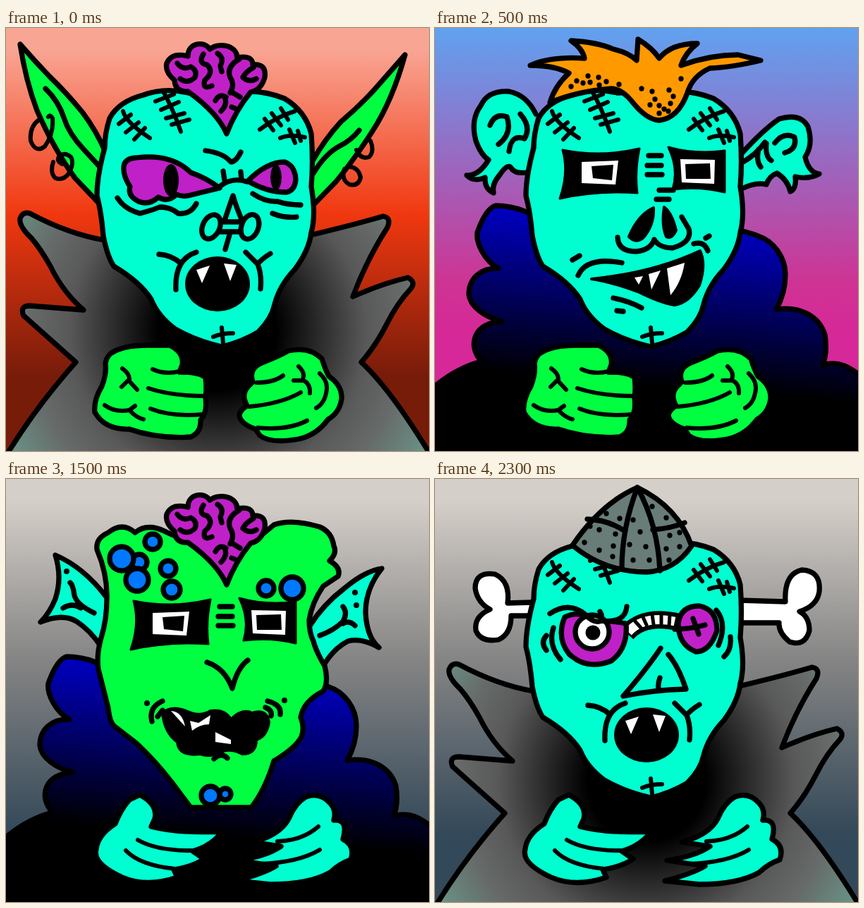
Animation of 600 by 600 pixels, one loop 2.5 s. Source, as an HTML page:

```html
<!DOCTYPE html>
<html lang="en">
<head>
<meta charset="utf-8">
<title>Monster mix</title>
<style>
  html, body { margin: 0; width: 100%; height: 100%; overflow: hidden; }
  svg { display: block; width: 100vw; height: 100vh; }
  g { fill: none; stroke: #000; stroke-width: 7.3; stroke-linecap: round; stroke-linejoin: round; }
  .thin { stroke-width: 6; }
  .cyan { fill: #00ffd0; }
  .green { fill: #00ff40; }
  .purple { fill: #c020c8; }
  .blue { fill: #0078ff; }
  .orange { fill: #ff9900; }
  .yellow { fill: #fff000; }
  .steel { fill: #687c78; }
  .white { fill: #fff; }
  .black { fill: #000; }
  .open { fill: none; }
  .flat { stroke: none; }
</style>
</head>
<body>
<svg viewBox="0 0 600 600">
  <defs>
    <linearGradient id="sunset" x2="0" y2="1">
      <stop offset=".05" stop-color="#f9a594"/><stop offset=".44" stop-color="#f03810"/><stop offset=".82" stop-color="#781c0a"/>
    </linearGradient>
    <linearGradient id="candy" x2="0" y2="1">
      <stop stop-color="#60a2f0"/><stop offset=".6" stop-color="#ce3494"/><stop offset=".72" stop-color="#d62898"/>
    </linearGradient>
    <linearGradient id="fog" x2="0" y2="1">
      <stop offset=".05" stop-color="#d5cfc9"/><stop offset=".43" stop-color="#848484"/><stop offset=".84" stop-color="#334858"/>
    </linearGradient>
    <linearGradient id="fur" gradientUnits="userSpaceOnUse" x1="90" x2="70" y1="255" y2="488">
      <stop stop-color="#0000c0"/><stop offset="1" stop-color="#000"/>
    </linearGradient>
    <radialGradient id="cloak" gradientUnits="userSpaceOnUse" cx="300" cy="430" r="350">
      <stop offset=".24" stop-color="#000"/><stop offset=".6" stop-color="#585858"/>
      <stop offset=".76" stop-color="#666a69"/><stop offset="1" stop-color="#6a988a"/>
    </radialGradient>
  </defs>

  <!-- backdrops -->
  <g class="flat" data-in="02"><rect width="600" height="600" fill="url(#sunset)"/></g>
  <g class="flat" data-in="1"><rect width="600" height="600" fill="url(#candy)"/></g>
  <g class="flat" data-in="34"><rect width="600" height="600" fill="url(#fog)"/></g>

  <!-- ears -->
  <g data-in="02">
    <path class="green" d="M142 178Q128 145 108 119Q85 91 62 69Q40 46 20 23Q28 75 44 117Q68 172 98 213L135 252"/>
    <path class="green" d="M434 190Q452 158 475 133Q500 112 522 88L566 38Q548 103 520 146Q495 185 468 218L434 253"/>
    <path d="M56 86Q74 103 82 127Q89 150 111 173L134 198M501 145Q490 159 474 167Q453 178 436 206"/>
    <path class="thin" d="M47 130Q33 140 35 160Q42 178 55 168Q68 150 66 128Q63 122 60 126M67 190Q62 205 70 213Q82 217 90 205Q97 190 92 183Q84 176 76 181Q70 188 80 193M517 160Q523 175 515 183Q503 187 497 173M480 200Q475 215 487 222Q500 225 503 212Q500 198 488 197"/>
  </g>
  <g data-in="1" class="cyan">
    <path d="M143 122Q130 95 105 90Q75 88 65 110Q50 130 58 160Q65 180 76 187Q62 210 45 209Q55 219 71 212Q70 228 83 234Q80 222 92 208Q104 190 109 200Q115 207 130 205"/>
    <path d="M435 178Q465 145 488 129Q518 120 529 140Q537 165 525 183Q530 205 545 207Q530 215 511 211Q513 228 504 232Q500 215 485 206Q474 210 470 222Q455 218 435 228"/>
    <path class="open" d="M78 138Q85 120 102 126Q110 150 90 165M121 122Q137 140 127 157Q108 150 105 175M437 190Q455 180 468 162M459 172Q455 188 462 197M470 164Q468 182 477 188M482 163Q495 147 510 155Q514 172 496 177"/>
  </g>
  <g data-in="3" class="cyan">
    <path d="M142 167Q110 125 70 108Q80 140 70 170Q62 190 49 203Q80 190 100 202Q120 215 135 238"/>
    <path d="M431 208Q450 178 480 155Q510 130 533 127Q510 155 510 190Q512 225 529 239Q505 225 485 230Q465 240 450 265"/>
    <path class="open" d="M91 147Q95 150 97 165Q100 178 125 190M81 183Q94 175 106 183M478 181Q485 190 478 202Q465 215 445 222M478 205Q487 200 495 208"/>
    <path stroke-width="8" d="M86 131h0M495 161h0M497 179h0"/>
  </g>
  <g data-in="4" class="white">
    <path d="M137 175L103 176Q107 145 85 135Q57 131 57 155Q60 175 78 185Q55 195 58 215Q65 232 90 228Q108 220 108 194H137"/>
    <path d="M431 172L497 174Q495 135 520 129Q548 130 545 160Q542 180 517 188Q531 195 531 215Q525 238 503 231Q487 218 488 204H431"/>
  </g>

  <!-- bodies -->
  <g data-in="04">
    <path fill="url(#cloak)" d="M3 602Q46 533 99 474L25 408Q19 394 34 394L110 400Q81 375 63 338Q49 313 36 298Q18 281 20 270Q24 260 34 263Q88 292 140 301L300 330L435 293Q490 280 535 267Q547 269 541 283Q512 328 492 381Q535 362 570 354Q582 360 574 370Q555 390 540 420Q525 450 504 474Q545 512 600 602"/>
  </g>
  <g data-in="123">
    <path fill="url(#fur)" d="M-5 512Q30 482 66 473C45 450 55 418 95 416C70 410 50 395 48 378C48 355 65 340 90 341C70 330 58 305 60 290Q72 256 86 252Q110 252 132 262L300 300L436 288Q455 293 458 295C480 302 497 325 497 350C497 370 492 385 484 399C520 394 545 410 553 435Q557 460 550 478C575 471 590 483 605 494V610H-5Z"/>
  </g>

  <!-- heads -->
  <g data-in="014">
    <path class="cyan" d="M258 92Q225 84 195 95Q160 104 147 128Q140 150 140 170Q129 210 129 238Q135 260 138 295Q144 325 153 338Q190 360 206 385Q215 408 240 427Q270 444 306 452Q335 445 358 431Q377 412 381 392Q388 365 410 342Q430 315 433 290Q440 265 433 225Q436 190 433 150Q425 118 395 100Q370 90 345 90Z"/>
    <path class="thin" d="M166 118Q170 134 204 156M160 136L177 123M170 148L188 134M182 158L197 142M223 90Q237 115 248 147M212 104L238 94M220 116L245 105M227 128L253 121M235 137L260 130M360 144Q385 125 410 118M367 129L379 145M377 121L390 138M390 114L400 130M389 156Q403 150 424 155M402 144L410 163M414 146L418 160M306 425L308 447M294 438Q305 433 322 433"/>
  </g>
  <g data-in="23">
    <path class="green" d="M258 86Q240 82 225 74Q200 62 183 76Q165 60 145 76Q127 84 129 100Q144 135 143 170Q143 200 135 225Q128 250 131 270L145 325Q147 345 154 351L185 375Q210 398 235 430L262 466H348Q368 440 380 400Q410 382 419 366Q424 352 418 338Q422 315 450 301Q458 288 452 265Q440 245 436 230Q430 218 430 200Q434 175 450 152L471 138Q476 126 459 116Q470 105 465 95Q462 75 445 68Q405 56 380 65L350 90L315 92Z"/>
    <g class="blue">
      <circle cx="189" cy="118" r="11"/><circle cx="164" cy="113" r="17"/><circle cx="186" cy="143" r="16"/>
      <circle cx="208" cy="89" r="11"/><circle cx="230" cy="127" r="11"/><circle cx="235" cy="157" r="12"/>
      <circle cx="369" cy="155" r="11"/><circle cx="406" cy="155" r="16"/>
      <circle cx="311" cy="447" r="8"/><circle cx="290" cy="449" r="13"/>
    </g>
  </g>

  <!-- hair and hats -->
  <g data-in="03">
    <path class="purple" d="M258 90Q240 91 239 74Q225 62 228 50Q235 34 258 40C258 20 282 18 289 30C302 20 327 24 328 42Q350 38 350 52Q370 50 367 70Q362 88 347 91Q325 118 313 150Q300 120 258 90Z"/>
    <path d="M243 50Q250 60 262 55Q272 60 268 70Q258 80 247 72M280 37Q272 50 285 52Q296 62 282 74Q278 88 292 82M300 36Q310 42 304 54L306 62M331 44Q312 55 318 70Q325 80 318 92M351 56Q340 62 336 70Q345 78 355 72M297 103Q303 92 312 98M305 118Q315 108 310 98M322 92L332 98M320 112L327 115"/>
  </g>
  <g data-in="1">
    <path class="orange" d="M163 106Q170 82 190 64Q170 53 135 53Q165 40 212 43Q210 30 193 18Q230 20 253 30Q275 35 286 46L288 16Q308 28 318 43Q335 22 372 22Q355 35 349 53Q390 38 430 38L462 46Q420 56 390 57Q365 68 358 92Q345 128 318 131Q300 130 280 105Q265 86 250 86Q200 90 163 106Z"/>
    <path d="M193 83h0M201 75h0M210 78h0M217 68h0M220 77h0M232 70h0M233 81h0M243 76h0M261 80h0M349 72h0M293 86h0M308 90h0M312 101h0M305 109h0M318 110h0M332 88h0M338 97h0M334 107h0M325 115h0M318 121h0M331 118h0"/>
  </g>
  <g data-in="2">
    <path class="yellow" d="M263 86Q252 55 270 40Q300 30 327 43Q345 21 372 28Q402 40 404 70Q405 112 370 119Q340 119 322 98L312 90Z"/>
    <path d="M290 83Q290 67 305 69Q314 76 322 97M328 42Q325 62 337 80Q348 100 366 93Q372 72 354 69"/>
  </g>
  <g data-in="4">
    <path class="steel" d="M195 94Q235 35 287 12Q345 40 364 95Q340 130 300 132Q240 132 195 94Z"/>
    <path d="M287 12Q265 70 265 127M287 12Q316 65 319 130M216 57Q245 58 268 73M309 72Q335 70 354 62"/>
    <path d="M243 49h0M262 56h0M220 67h0M233 72h0M256 78h0M212 90h0M233 101h0M253 95h0M252 110h0M281 58h0M276 93h0M281 115h0M299 96h0M291 75h0M308 39h0M328 55h0M333 80h0M347 76h0M347 96h0M328 99h0M332 115h0M304 115h0"/>
  </g>

  <!-- eyes -->
  <g data-in="0">
    <path class="purple" d="M167 197Q168 185 185 184Q235 178 262 205Q285 213 303 227Q278 233 262 237Q250 240 242 236Q230 248 216 240Q203 252 188 246Q172 238 176 225Q166 210 167 197ZM343 217Q370 190 395 190Q410 195 411 215Q410 230 398 233Q370 233 343 217Z"/>
    <g class="black flat"><ellipse cx="234" cy="216" rx="11" ry="23"/><ellipse cx="383" cy="212" rx="8" ry="18"/></g>
    <path d="M303 225Q320 211 342 218M308 203L310 216M333 204L334 216M283 174Q308 177 319 190Q326 190 333 176M158 241Q168 257 190 263Q206 259 218 254Q234 254 244 263Q262 265 270 249M350 235Q368 247 385 246Q400 251 418 251M378 263Q395 270 412 268"/>
  </g>
  <g data-in="13">
    <path class="black" stroke-width="3" d="M181 173Q235 184 290 171Q283 205 287 234Q230 230 177 242Q190 205 181 173ZM331 169Q370 180 411 174V233Q375 224 337 229Q346 200 331 169Z"/>
    <path class="white flat" fill-rule="evenodd" d="M208 190L260 188L256 222L208 220ZM222 196L253 194L251 216L224 213ZM348 186L397 187L396 221L350 219ZM355 193L390 192L391 214L356 214Z"/>
    <path d="M303 181H321M301 195H321M301 208H322"/>
  </g>
  <g data-in="2">
    <path class="black" stroke-width="3" d="M183 192Q230 178 265 191Q295 195 303 208Q300 232 270 240Q225 262 190 240Q178 225 183 192Z"/>
    <circle class="white flat" cx="236" cy="218" r="18"/><circle class="black flat" cx="236" cy="218" r="10.5"/>
    <path class="thin" d="M177 180Q193 177 200 189M168 200L184 208M165 214L182 216M167 231L184 224M238 180L240 188M263 176Q280 178 274 190M312 174Q320 186 309 198M181 262Q208 268 212 254M214 266Q240 276 243 254"/>
    <path class="thin" d="M333 184Q370 220 415 249M357 185L341 200M372 196L350 211M383 206L364 228M398 221L378 237M411 235L398 251"/>
  </g>
  <g data-in="4">
    <path stroke-width="25" stroke-linecap="butt" d="M272 219Q296 192 345 203"/>
    <path stroke="#fff" stroke-width="13" stroke-linecap="butt" d="M274 217Q296 193 340 202"/>
    <path stroke-width="5" d="M284 202L292 211M295 196L300 207M308 192L310 206M321 192L321 207M333 193L332 209"/>
    <path class="purple" d="M184 196Q172 225 190 248Q215 272 250 258Q274 240 271 205Q245 200 230 202Q205 185 184 196ZM345 205Q348 180 375 180Q400 185 400 215Q390 245 370 245Q345 235 345 205Z"/>
    <circle class="white" cx="223" cy="217" r="24"/><circle class="black flat" cx="224" cy="218" r="10.5"/>
    <path d="M163 191Q190 173 213 192Q226 206 236 201Q238 194 234 188M236 201Q270 205 272 181M340 213Q362 213 383 207M366 198L374 220M158 222Q149 232 158 243M168 211Q160 235 178 256M399 186Q415 205 402 236M419 224Q421 242 410 252"/>
  </g>

  <!-- noses -->
  <g data-in="0">
    <path d="M322 238Q316 255 310 273M322 238Q327 255 334 271M305 275H332M303 289H330M318 290L311 314"/>
    <ellipse class="cyan" cx="291" cy="282" rx="12" ry="18" transform="rotate(25 291 282)"/>
    <ellipse class="cyan" cx="346" cy="282" rx="12" ry="18" transform="rotate(20 346 282)"/>
  </g>
  <g data-in="1">
    <path class="black" stroke-width="4" d="M310 255Q288 265 275 296Q285 306 295 298Q311 280 310 255ZM325 254Q336 262 342 287Q336 300 328 296Q321 280 325 254Z"/>
    <path d="M259 297Q260 317 285 317Q306 315 311 300Q318 312 337 312Q365 304 360 285Q354 275 350 268M318 230H338M314 243H332"/>
  </g>
  <g data-in="24"><path d="M320 240Q300 270 267 308Q310 299 356 298Q345 265 331 249M319 282Q316 290 317 297"/></g>
  <g data-in="3"><path d="M285 260Q310 268 321 297Q328 268 343 257"/></g>

  <!-- mouths -->
  <g data-in="04">
    <ellipse class="black flat" cx="300" cy="363" rx="46" ry="39"/>
    <path class="white flat" d="M270 343L289 337L278 362ZM309 334L327 336L318 359Z"/>
    <path d="M217 321Q235 322 248 334M270 318Q239 328 241 371M340 318L357 335Q362 328 375 320M357 335Q363 350 361 370"/>
  </g>
  <g data-in="1">
    <path class="black" stroke-width="4" d="M222 356Q310 347 376 316Q385 335 375 365Q360 390 340 393Q320 390 290 375Q250 360 222 356Z"/>
    <path class="white flat" d="M283 354L295 352L289 364ZM303 349L320 344L307 371ZM329 341L354 333Q350 360 334 379Z"/>
    <path d="M195 329L205 323M203 351Q215 324 265 333M367 306Q382 302 387 316M384 298L389 295M253 383Q275 387 293 397M258 401L267 402"/>
  </g>
  <g data-in="2">
    <path class="purple" d="M211 349Q240 343 255 326Q282 314 302 334Q322 316 342 332Q355 344 373 341Q382 355 365 357Q345 361 327 384Q307 397 290 379Q268 374 255 368Q220 370 211 349Z"/>
    <path class="thin" d="M262 344L273 358L281 344M315 344L325 359L334 344"/>
  </g>
  <g data-in="3">
    <path class="black" stroke-width="4" d="M222 332Q235 320 258 330Q275 338 290 329Q310 326 319 341Q335 325 349 332Q370 325 373 345Q370 365 355 370Q355 390 335 390Q320 382 308 386Q290 396 275 390Q245 394 243 373Q225 360 222 332Z"/>
    <path class="white flat" d="M234 329Q250 330 254 351ZM261 343L273 346L290 335L288 348Q275 348 264 357ZM297 359L319 370V376L297 373Z"/>
    <path d="M207 344Q202 324 222 315M215 337L222 328M371 315Q391 320 389 334M368 324Q378 328 376 336M295 397Q305 387 314 396"/>
    <path stroke-width="8" d="M200 318h0M395 314h0"/>
  </g>

  <!-- hands -->
  <g data-in="012">
    <path class="green" d="M148 462Q165 450 200 450L232 450Q253 460 250 478L246 488Q275 488 283 496Q285 510 283 525Q286 545 276 556Q277 574 262 580Q215 583 175 569Q140 570 126 545Q124 528 136 508Q143 490 141 476Q142 468 148 462Z"/>
    <path class="green" d="M350 502Q343 482 365 474Q388 465 400 458Q430 451 448 469Q453 485 458 494Q477 507 476 526Q473 546 457 555Q440 578 415 583Q375 590 360 578L354 569Q331 561 331 548Q334 540 342 536Q333 520 343 509Z"/>
    <path class="thin" d="M208 484Q225 492 246 487M202 511Q235 522 283 522M205 540Q235 552 280 548M165 483Q175 490 175 498L164 509M174 500L186 513M140 535Q155 546 175 542L183 536M175 542Q185 553 195 555M355 503Q380 503 393 493M345 537Q390 533 418 517M357 567Q400 571 427 557M445 490Q456 500 455 512Q453 532 440 539M415 480Q426 490 420 500L408 500M422 500Q432 505 431 518"/>
  </g>
  <g data-in="34">
    <path class="cyan" d="M190 448Q216 462 211 482L206 493Q245 503 307 500Q292 520 265 528L281 539Q265 550 238 554L243 565Q200 580 165 565Q122 545 128 525Q130 505 155 489Q163 468 175 455Z"/>
    <path class="cyan" d="M425 451Q445 443 460 460Q469 470 465 484Q486 482 478 511Q496 520 489 540Q472 546 460 558Q430 575 375 575L326 570Q365 560 383 549L329 541Q370 535 390 521L350 515Q390 505 402 480Q410 460 425 451Z"/>
    <path class="thin" d="M187 512Q215 528 268 527M170 527Q190 548 240 553M385 514Q420 513 443 493M360 546Q415 544 445 526"/>
  </g>
</svg>
<script>
  const POSE_MS = 500, POSES = 5;
  const parts = document.querySelectorAll('[data-in]');
  const start = performance.now();

  function draw() {
    const pose = Math.floor((performance.now() - start) / POSE_MS) % POSES;
    for (const part of parts) {
      part.style.display = part.dataset.in.includes(pose) ? '' : 'none';
    }
    requestAnimationFrame(draw);
  }
  draw();
</script>
</body>
</html>
```
